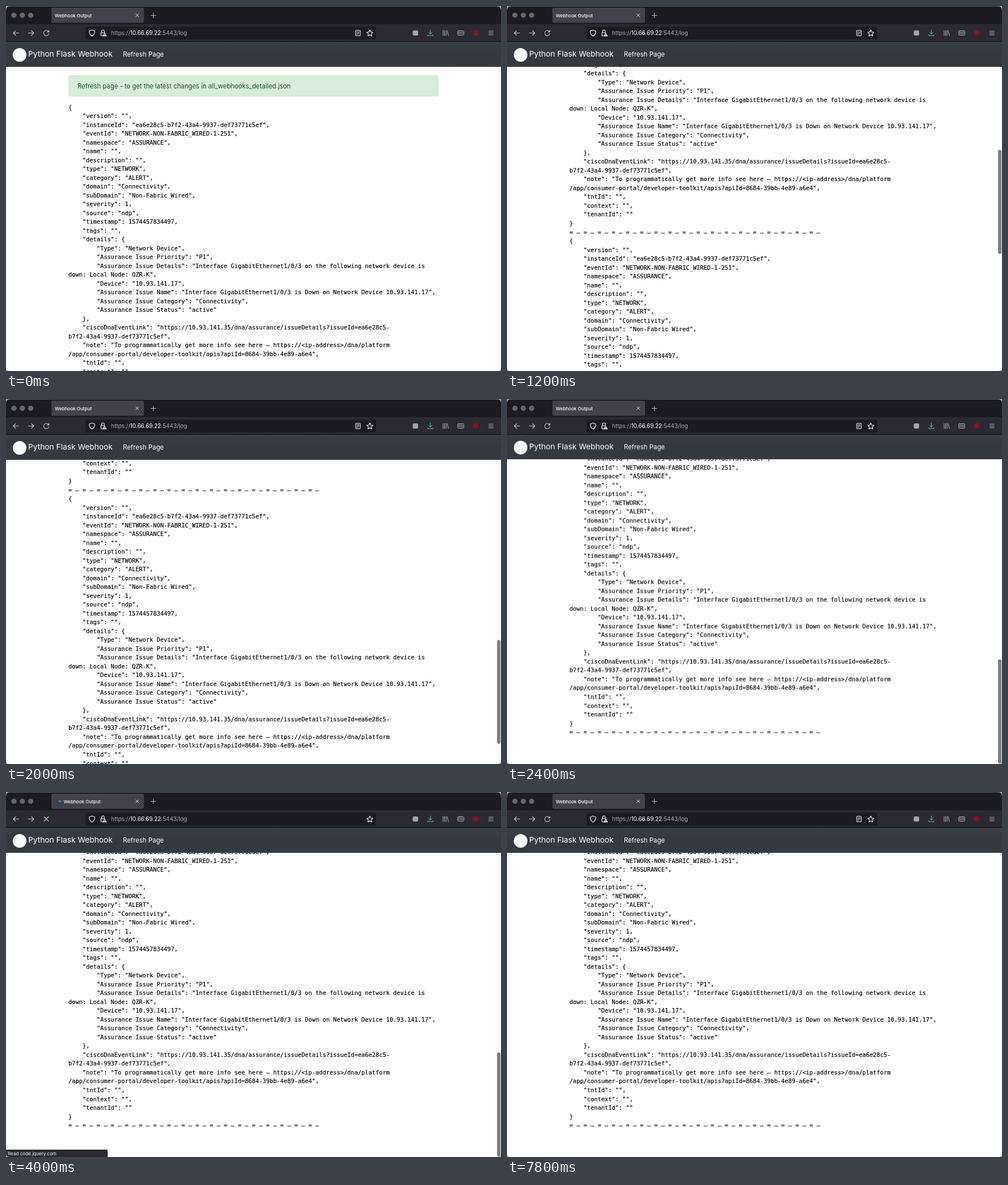
Write an HTML page that moves like this. It is 872 px wide and 642 px high and loops after 8 s.

```html
<!DOCTYPE html>
<html lang="en">
<head>
<meta charset="utf-8">
<title>Webhook Output</title>
<style>
  html, body { margin: 0; width: 100%; height: 100%; overflow: hidden; background: #a5a5a1; }
  #window { position: relative; width: 872px; height: 642px; overflow: hidden; border-radius: 7px 7px 6px 6px; background: #fefefe; font-family: Inter, "Open Sans", sans-serif; }
  #page, #doc, #chrome { position: absolute; left: 0; top: 0; width: 872px; height: 642px; }
  #page { animation: bounce 8s infinite step-end; }
  #doc { animation: scroll 8s infinite; }
  #alert { position: absolute; box-sizing: border-box; left: 110px; top: 122px; width: 652px; height: 37px; padding-left: 15px; border: 1px solid #c9e5ce; border-radius: 3px; background: #d7ecd9; color: #1b572a; font-size: 11.3px; line-height: 36px; }
  pre { position: absolute; left: 110px; top: 170.5px; margin: 0; color: #000; font: 10.34px/15.515px "DejaVu Sans Mono", monospace; -webkit-text-stroke: .15px #000; }
  #navbar { position: absolute; left: 0; top: 62px; width: 872px; height: 44.5px; background: linear-gradient(#3a3f45, #343a40 40%); color: #fff; }
  #navbar * { position: absolute; white-space: pre; line-height: 20px; }
  #logo { left: 11.5px; top: 11.5px; width: 24px; height: 24px; border-radius: 50%; background: #fff; }
  #brand { left: 39px; top: 12px; font-size: 13.75px; }
  #refresh { left: 206px; top: 13px; font-size: 11.4px; }
  #thumb { position: absolute; left: 865px; top: 0; width: 6px; height: 183px; border-radius: 3px; background: #7e7e7f; animation: thumb 8s infinite; }
  #status { position: absolute; box-sizing: border-box; left: 0; top: 628.5px; width: 178.5px; height: 14px; padding-left: 3px; border-radius: 0 2px 0 0; background: #2b2a33; color: #fbfbfe; font-size: 8.1px; line-height: 15px; opacity: 0; animation: status 8s infinite step-end; }
  .idle { animation: idle 8s infinite step-end; }
  .busy { opacity: 0; animation: busy 8s infinite step-end; }
  #tabTitle { animation: title 8s infinite step-end; }
  #dot { animation: dot 8s infinite step-end; }

  /* 2.5% is one 200 ms tick */
  @keyframes scroll {
    0%, 5% { transform: none; animation-timing-function: steps(2); }
    10% { transform: translateY(-155px); animation-timing-function: steps(4); }
    20% { transform: translateY(-429px); animation-timing-function: steps(4); }
    30%, 100% { transform: translateY(-631px); }
  }
  @keyframes thumb {
    0% { opacity: 0; transform: translateY(108px); animation-timing-function: step-end; }
    7.5% { opacity: 1; transform: translateY(110px); animation-timing-function: step-end; }
    10% { opacity: 1; transform: translateY(116.5px); animation-timing-function: steps(4); }
    20% { opacity: 1; transform: translateY(389.5px); animation-timing-function: steps(4); }
    30%, 55% { opacity: 1; transform: translateY(458px); animation-timing-function: step-end; }
    57.5%, 100% { opacity: 0; transform: translateY(458px); }
  }
  @keyframes bounce { 0%, 47.5% { transform: none; } 30% { transform: translateY(-.5px); } }
  @keyframes idle { 0%, 55% { opacity: 1; } 47.5% { opacity: 0; } }
  @keyframes busy { 0%, 55% { opacity: 0; } 47.5% { opacity: 1; } }
  @keyframes status { 0%, 55% { opacity: 0; } 50% { opacity: 1; } }
  @keyframes title { 0%, 55% { transform: none; } 47.5% { transform: translateX(15.5px); } }
  @keyframes dot { 0%, 50% { transform: none; } 47.5% { transform: translateX(-5px); } 52.5% { transform: translateX(4px); } }
</style>
</head>
<body>
<div id="window">
  <div id="page">
    <div id="doc">
      <div id="alert">Refresh page - to get the latest changes in all_webhooks_detailed.json</div>
      <pre id="log"></pre>
    </div>
    <div id="navbar">
      <i id="logo"></i>
      <span id="brand">Python Flask Webhook</span>
      <span id="refresh">Refresh Page</span>
    </div>
  </div>
  <div id="thumb"></div>
  <div id="status">Read code.jquery.com</div>

  <svg id="chrome" viewBox="0 0 872 642" fill="none" stroke-linecap="round" stroke-linejoin="round">
    <path fill="#1c1b22" d="M0 0h872v33H0z"/>
    <path fill="#2b2a33" d="M0 32h872v30.5H0z"/>
    <path stroke="#111017" d="M0 62.5h872"/>
    <path stroke="#59585e" d="M5 .5h862"/>
    <g fill="#67666b">
      <circle cx="14" cy="16.3" r="4.6"/><circle cx="28.8" cy="16.3" r="4.6"/><circle cx="43.5" cy="16.3" r="4.6"/>
    </g>
    <rect x="80" y="3" width="163" height="26.5" rx="3" fill="#42414d"/>
    <text id="tabTitle" x="86" y="19.8" font-size="8.1" font-weight="500" fill="#fbfbfe">Webhook Output</text>
    <g class="busy"><circle id="dot" cx="95" cy="16.3" r="1.7" fill="#2c9cf2"/></g>
    <g stroke="#e4e4e9">
      <path d="m228.7 13.8 5 5m0-5-5 5"/>
      <path stroke="#bcbbc1" d="M255.5 16.5h8.4m-4.2-4.2v8.4"/>
    </g>

    <rect x="140" y="36.5" width="512" height="22.5" rx="3" fill="#1c1b22"/>
    <g stroke="#c5c4ca" stroke-width="1.1">
      <path d="M22.5 47.5h-9.6m4-4-4 4 4 4"/>
      <path d="M39.3 47.5h9.6m-4-4 4 4-4 4"/>
      <path class="idle" d="M74.8 45a4.6 4.6 0 1 0 .7 3.7M75.6 42.7v2.9h-2.9"/>
      <path class="busy" d="m67 43.5 8 8m0-8-8 8"/>
    </g>
    <g stroke="#f0f0f4" stroke-width="1.1">
      <path d="M151.5 42.3 156.4 44c0 4.3-1.5 7.2-4.9 9-3.4-1.8-4.9-4.7-4.9-9z"/>
      <path d="M168.5 46.5v-2.2a2.3 2.3 0 0 1 4.6 0v2.2M170.5 52.3h-3.3v-5.6h6.5"/>
      <path fill="#f0f0f4" stroke-width=".7" d="m174 47.5 3.2 5.5h-6.4z"/>
      <path stroke="#1c1b22" stroke-width=".8" d="M174 49.4v1.3m0 1.2v.1"/>
      <g class="idle">
        <rect x="616" y="42.7" width="8" height="9.6" rx="1"/>
        <path stroke-width=".9" d="M618 45.3h4m-4 2.2h4m-4 2.2h2.5"/>
      </g>
      <path d="m641 42.2 1.65 3.5 3.85.5-2.8 2.7.7 3.8-3.4-1.85-3.4 1.85.7-3.8-2.8-2.7 3.85-.5z"/>
    </g>
    <text x="185" y="51.3" font-size="9.95" fill="#a9a8af">https://<tspan fill="#fbfbfe">10.66.69.22</tspan>:5443/log</text>

    <rect x="716.5" y="43" width="9.5" height="9" rx="2" fill="#a5a4aa"/>
    <path stroke="#4aa890" stroke-width="1.2" d="M747.5 42v7.2m-3-2.9 3 3 3-3M743 50.5v1.7h9v-1.7"/>
    <g stroke="#b4b3b9">
      <path d="M770 43v9m2.6-9v9m2.6-9v9m1.9-8.7 2.3 8.7"/>
      <rect x="795.8" y="43.5" width="10.6" height="7.8" rx="1"/>
      <path stroke-width=".8" d="M798 45.7h2.3v3H798zm4 0h2.5m-2.5 1.5h2.5m-2.5 1.5h2.5"/>
      <path d="M850.3 44.3h8m-8 3.2h8m-8 3.2h8"/>
    </g>
    <circle cx="827.5" cy="47.3" r="5" fill="#85141d"/>
  </svg>
</div>
<script>
  const record = `{
    "version": "",
    "instanceId": "ea6e28c5-b7f2-43a4-9937-def73771c5ef",
    "eventId": "NETWORK-NON-FABRIC_WIRED-1-251",
    "namespace": "ASSURANCE",
    "name": "",
    "description": "",
    "type": "NETWORK",
    "category": "ALERT",
    "domain": "Connectivity",
    "subDomain": "Non-Fabric Wired",
    "severity": 1,
    "source": "ndp",
    "timestamp": 1574457834497,
    "tags": "",
    "details": {
        "Type": "Network Device",
        "Assurance Issue Priority": "P1",
        "Assurance Issue Details": "Interface GigabitEthernet1/0/3 on the following network device is
down: Local Node: QZR-K",
        "Device": "10.93.141.17",
        "Assurance Issue Name": "Interface GigabitEthernet1/0/3 is Down on Network Device 10.93.141.17",
        "Assurance Issue Category": "Connectivity",
        "Assurance Issue Status": "active"
    },
    "ciscoDnaEventLink": "https://10.93.141.35/dna/assurance/issueDetails?issueId=ea6e28c5-
b7f2-43a4-9937-def73771c5ef",
    "note": "To programmatically get more info see here – https://<ip-address>/dna/platform
/app/consumer-portal/developer-toolkit/apis?apiId=8684-39bb-4e89-a6e4",
    "tntId": "",
    "context": "",
    "tenantId": ""
}
${"= – ".repeat(18)}
`;
  document.getElementById("log").textContent = record.repeat(2);
</script>
</body>
</html>
```
